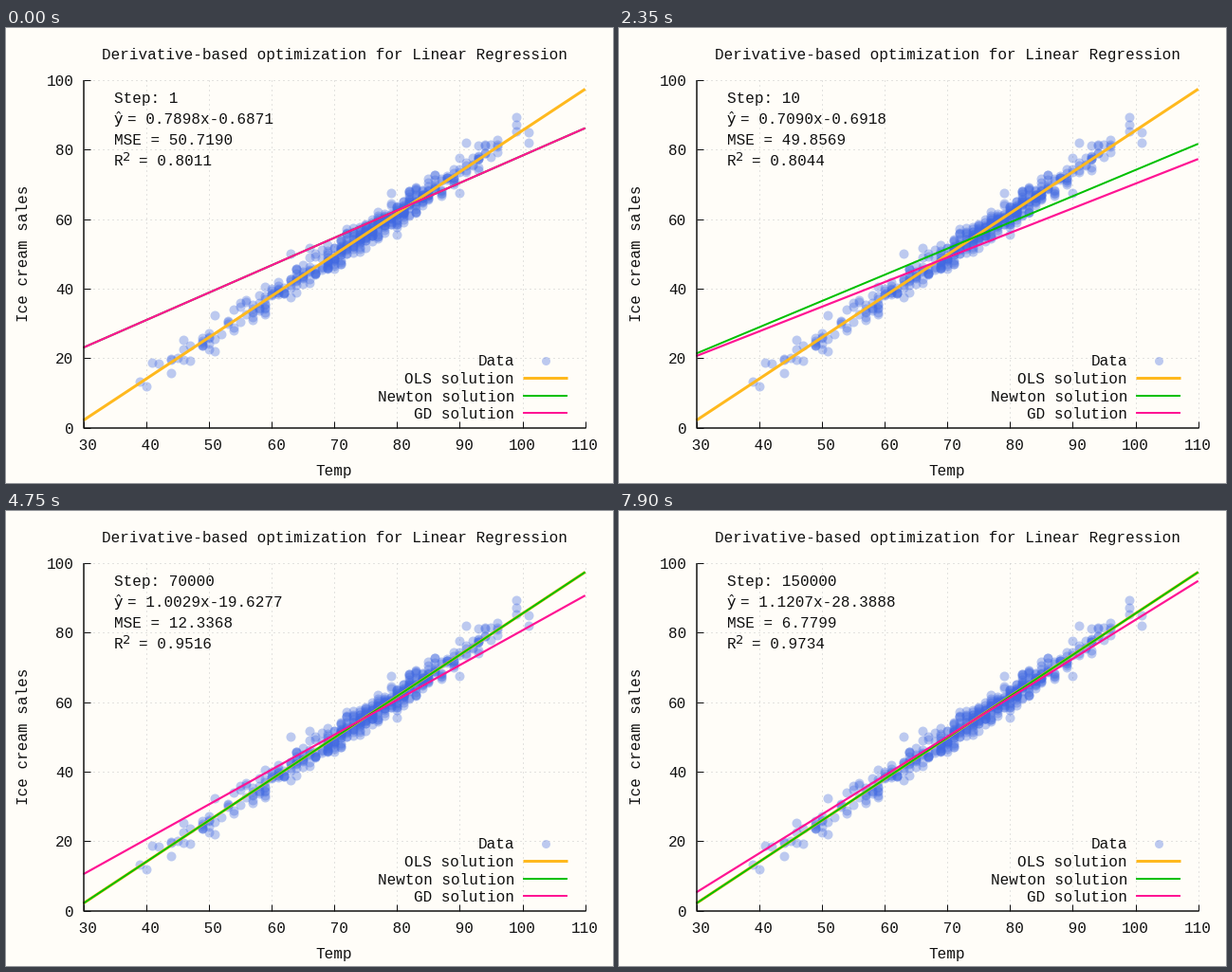
Animation, 640 px wide and 480 px high, one loop 8000 ms. Source, as a matplotlib script:

```python
import numpy as np
import matplotlib.pyplot as plt
from matplotlib.animation import FuncAnimation

W, H = 640, 480
PT = 0.72                      # points per pixel at 100 dpi
BG, INK = "#fffdf8", "#101010"
BLUE, GOLD, GREEN, PINK = "#4169e1", "#ffb91e", "#00c000", "#ff1493"
MONO, SANS = "Liberation Mono", "DejaVu Sans"

INTERVAL = 50
FRAMES = 160
FIRST_HOLD, STEP_HOLD = 750, 200
STEPS = [*range(1, 11), *range(1000, 9001, 2000), *range(10000, 150001, 10000)]

# least squares solution, and the line along which descent creeps towards it
OLS_M, OLS_B = 1.19201, -33.6985
RATIO = 0.013438
START_GAP, CREEP = 33.01125, 1.21821e-5
# the slope also swings to either side of that line, ever less
SWING, SWING_DECAY = 0.04142, 0.9946
VARIANCE, BEST_MSE = 254.95, 5.85725


def px(x):
    return 81.5 + (x - 30) * 6.615


def py(y):
    return 421.5 - y * 3.665


def descent(n):
    """Slope, intercept and error of gradient descent after n steps."""
    gap = START_GAP * np.exp(-CREEP * n)
    swing = -SWING * (-SWING_DECAY) ** (n - 1) * -1
    m = OLS_M - RATIO * gap + swing
    b = OLS_B + gap + RATIO * swing
    mse = BEST_MSE + 0.032727 * gap ** 2 + 9.1986 * (swing / SWING) ** 2
    return m, b, mse


def newton(n):
    if n == 1:
        return descent(1)[:2]
    left = np.exp(-0.004 * (n - 6))
    return OLS_M - 0.4445 * left, OLS_B + 32.9 * left


def cloud():
    """Whole-degree temperatures around the fitted line, plus some outliers."""
    rng = np.random.default_rng(12)
    x = np.round(np.r_[rng.normal(76, 8, 330), rng.uniform(43, 97, 130)])
    x = x[(x >= 43) & (x <= 96)]
    noise = np.clip(rng.normal(0, 2, x.size), -4, 4)
    outliers = [(39, 13.2), (40, 11.8), (41, 18.8), (42, 18.5), (51, 21.9),
                (51, 32.2), (63, 50.1), (66, 51.8), (72, 57.2), (79, 67.4),
                (80, 55.4), (90, 67.5), (91, 81.9), (99, 85.2), (99, 87.1),
                (99, 89.4), (101, 82), (101, 85)]
    ox, oy = np.array(outliers).T
    return np.r_[x, ox], np.r_[OLS_M * x + OLS_B + noise, oy]


fig = plt.figure(figsize=(W / 100, H / 100), dpi=100, facecolor=BG)
ax = fig.add_axes([0, 0, 1, 1])
ax.set(xlim=(0, W), ylim=(H, 0))
ax.axis("off")


def text(x, y, s, size=16, font=MONO, **kw):
    return ax.text(x, y, s, fontsize=size * PT, family=font, color=INK,
                   va="baseline", **kw)


def line(xs, ys, color, width, **kw):
    return ax.plot(xs, ys, color=color, lw=width * PT,
                   solid_capstyle="butt", **kw)[0]


def dots(xs, ys, size):
    ax.plot(xs, ys, "o", color=BLUE, alpha=0.35, ms=size * PT, mew=0)


def ends(m, b):
    return [py(30 * m + b), py(110 * m + b)]


SPAN = [px(30), px(110)]
TOP, BASE = py(100), py(0)
DOTTED = dict(color="#c8c8c8", width=1, ls=(0, (1, 4)))

# grid, ticks and tick labels
for v in range(0, 101, 20):
    if v:
        line(SPAN, [py(v)] * 2, **DOTTED)
    line([SPAN[0], SPAN[0] + 7], [py(v)] * 2, INK, 1)
    text(71.5, py(v) + 6, str(v), ha="right")
for v in range(30, 111, 10):
    if v > 30:
        line([px(v)] * 2, [TOP, BASE], **DOTTED)
    line([px(v)] * 2, [BASE, BASE - 7], INK, 1)
    text(px(v), 445, f"{v:3d}", ha="center")

temp, sales = cloud()
dots(px(temp), py(sales), 10)
line(SPAN, ends(OLS_M, OLS_B), GOLD, 3)
newton_line = line(SPAN, ends(*newton(1)), GREEN, 2)
gd_line = line(SPAN, ends(*descent(1)[:2]), PINK, 2.2)
line([SPAN[0], SPAN[0], SPAN[1]], [TOP, BASE, BASE], INK, 1.5)

text(346, 33.5, "Derivative-based optimization for Linear Regression",
     ha="center")
text(346, 472, "Temp", ha="center")
text(23, 238, "Ice cream sales", ha="center", rotation=90,
     rotation_mode="anchor")

# legend
text(536, 356.5, "Data", ha="right")
dots([569], [350.5], 9)
for row, (name, color, width) in enumerate(
        (("OLS", GOLD, 3), ("Newton", GREEN, 2), ("GD", PINK, 2))):
    y = 369 + 18.5 * row
    text(536, y + 6, name + " solution", ha="right")
    line([545, 592], [y, y], color, width)

# read-outs
text(113.5, 101, "ŷ", 16, SANS)
text(113.5, 145, "R")
text(123, 140, "2", 13, SANS)
step_text = text(113.5, 79, "")
fit_text = text(127.5, 101, "")
mse_text = text(113.5, 123, "")
r2_text = text(140, 145, "")


def draw(i):
    t = i * INTERVAL
    k = 0 if t < FIRST_HOLD else 1 + (t - FIRST_HOLD) // STEP_HOLD
    n = STEPS[min(k, len(STEPS) - 1)]
    m, b, mse = descent(n)
    gd_line.set_ydata(ends(m, b))
    newton_line.set_ydata(ends(*newton(n)))
    step_text.set_text(f"Step: {n}")
    fit_text.set_text(f"= {m:.4f}x{b:.4f}")
    mse_text.set_text(f"MSE = {mse:.4f}")
    r2_text.set_text(f"= {1 - mse / VARIANCE:.4f}")
    return gd_line, newton_line, step_text, fit_text, mse_text, r2_text


anim = FuncAnimation(fig, draw, frames=FRAMES, interval=INTERVAL,
                     repeat=True, repeat_delay=0)
plt.show()
```
